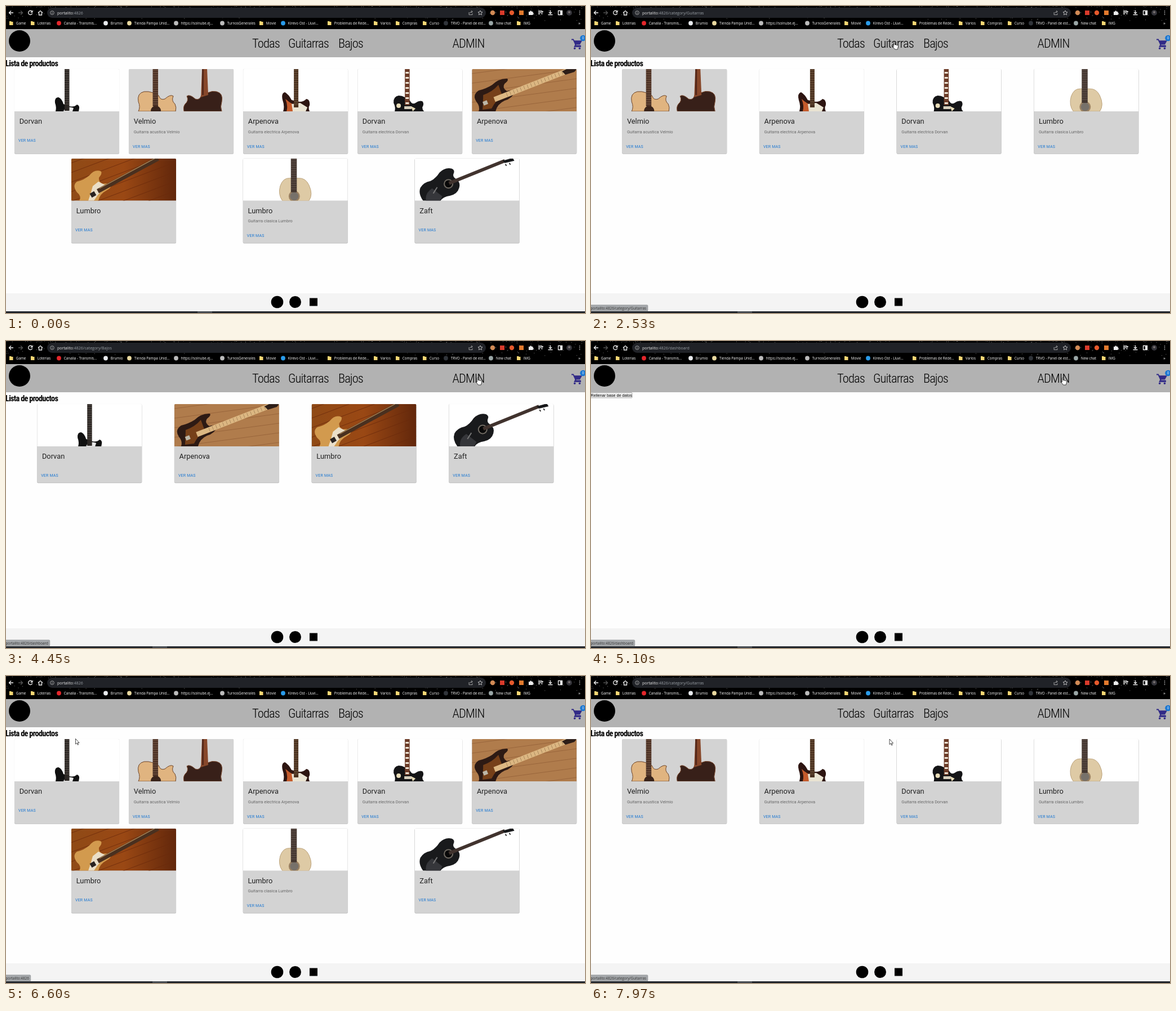
Animation of 1028x545 px, one loop 8 s. Source, as an HTML page:

```html
<!DOCTYPE html>
<html lang="es">
<head>
<meta charset="utf-8">
<title>Lista de productos</title>
<style>
  html, body { margin: 0; width: 100%; height: 100%; overflow: hidden; background: #fff; }
  svg { display: block; width: 100vw; height: 100vh; }
  .ui { font: 6.3px "Open Sans", "Noto Sans", sans-serif; fill: #fff; }
  .address { font-size: 7px; fill: #9aa0a6; }
  .nav { font: 300 22.5px "Roboto Condensed", Roboto, sans-serif; font-stretch: 75%; letter-spacing: -.9px; text-anchor: middle; }
  .heading { font: bold 14.2px "Roboto Condensed", Roboto, sans-serif; font-stretch: 75%; letter-spacing: -.65px; }
  .title { font: 12.85px Roboto, sans-serif; fill: #212121; }
  .about { font: 7.5px Roboto, sans-serif; fill: #666; }
  .more { font: 7px Roboto, sans-serif; letter-spacing: .2px; fill: #1976d2; }
  .button { font: 7.13px "Liberation Sans", Arial, sans-serif; }
  .line { fill: none; stroke: #eee; stroke-width: 1.3; }
</style>
</head>
<body>
<svg id="stage" viewBox="0 0 1028 545"></svg>
<script>
const HOST = 'portalito', PORT = ':4826';
const GUITARS_PATH = '/category/Guitarras', BASSES_PATH = '/category/Bajos', ADMIN_PATH = '/dashboard';
const LOOP = 8000;

const rect = (x, y, w, h, fill, extra = '') => `<rect x="${x}" y="${y}" width="${w}" height="${h}" fill="${fill}" ${extra}/>`;
const circle = (x, y, r, fill, extra = '') => `<circle cx="${x}" cy="${y}" r="${r}" fill="${fill}" ${extra}/>`;
const path = (d, fill, extra = '') => `<path d="${d}" fill="${fill}" ${extra}/>`;
const line = (d, color, width, extra = '') => `<path d="${d}" fill="none" stroke="${color}" stroke-width="${width}" ${extra}/>`;
const icon = (d, extra = '') => `<path class="line" d="${d}" ${extra}/>`;
const text = (cls, x, y, s, extra = '') => `<text class="${cls}" x="${x}" y="${y}" ${extra}>${s}</text>`;

let seed = 7;
const random = () => (seed = (seed * 16807) % 2147483647) / 2147483647;

function stars() {
  let d = '';
  for (let i = 0; i < 330; i++) d += `M${(random() * 1028).toFixed(1)} ${(random() ** 2 * 26).toFixed(1)}h.8`;
  return line(d, '#b4b4b4', .8);
}

function frets(x, width, bottom, color) {
  let d = '';
  for (let y = 2; y < bottom; y += 4) d += `M${x} ${y}h${width}`;
  return line(d, color, .5);
}

function planks(base, seam, slope) {
  let d = '';
  for (let y = -60; y < 140; y += 17) d += `M0 ${y}L186 ${y + slope}`;
  return rect(0, 0, 186, 75, base) + line(d, seam, .8);
}

// Pictures are drawn in a 186 x 75 box.
const white = rect(0, 0, 186, 75, '#fff');
const pictures = {
  blackBass: white
    + path('M73 75Q75 68 72 60Q71 50 78 50Q84 52 87 62L98 66Q106 68 111 63Q117 64 114 75Z', '#111')
    + path('M87 75Q91 64 105 69L103 75Z', '#e8e8e8')
    + rect(89, 0, 8.5, 74, '#2d2825') + frets(89, 8.5, 66, '#8c8078'),
  acousticPair: rect(0, 0, 186, 75, '#d3d3d3')
    + path('M17 75Q21 67 17 58Q14 43 27 40Q35 39 43 42L53 47Q56 56 64 53Q74 44 79 48Q75 56 82 62Q85 68 83 75Z', '#e0b480', 'stroke="#6b4328"')
    + circle(48, 74, 9, '#3a241b') + rect(42.5, 0, 9.5, 66, '#4b3024') + frets(42.5, 9.5, 64, '#a98e70')
    + path('M98 75Q96 67 100 62Q107 56 103 48Q108 44 118 53Q126 56 129 46L140 42Q148 38 156 40Q168 43 165 58Q162 67 165 75Z', '#382019', 'stroke="#7b4a30"')
    + path('M128 50L130 0H139L141 46Z', '#87472a') + rect(130, 0, 3, 46, '#54281a'),
  sunburst: white
    + path('M71 75Q74 66 70 55Q67 43 74 41Q81 45 86 55L100 58Q108 58 112 53Q119 54 118 64Q115 69 118 75Z', '#2d1511')
    + path('M77 75Q80 65 75 53Q84 61 92 64L94 75Z', '#c45b2c')
    + path('M86 62L101 60L114 68L111 75H88Z', '#e9e3d2')
    + rect(90, 0, 8, 68, '#49301f') + frets(90, 8, 64, '#a5886a'),
  singleCut: white
    + path('M66 75Q68 68 64 60Q63 49 73 47Q79 47 84 50L93 56Q97 64 103 60Q109 55 115 57Q119 61 115 68Q115 72 118 75Z', '#141416')
    + circle(73, 65, 4, '#e8dcb8') + rect(83, 66, 13, 5, '#d8d0bd') + path('M98 75L95 66L103 70Z', '#e8dcb8')
    + rect(84, 0, 8.5, 64, '#6c3c28') + line('M88.2 5V64', '#efe6d8', 6, 'stroke-dasharray="3 6"'),
  darkBass: planks('#b07c4c', '#946038', -25)
    + path('M12 75Q15 66 8 58Q0 46 12 38Q25 35 36 28Q48 16 63 17Q66 20 58 26Q53 33 62 39Q72 36 76 40Q72 52 58 56Q45 62 42 75Z', '#2d1a14')
    + path('M19 72Q20 55 20 46Q37 40 47 28L54 47Q42 56 35 70Z', '#764019')
    + line('M40 54L170 3', '#dcb782', 9) + line('M62 45.400L166 4.600', '#8f6e48', 7, 'stroke-dasharray=".6 6"')
    + path('M160 4L168 0H186L182 5L166 10Z', '#2d1e18') + rect(20, 56, 8, 7, '#bdb7a8', 'transform="rotate(-22 25 60)"'),
  goldBass: planks('url(#redWood)', '#6b2a0c', -70)
    + path('M14 75Q19 67 10 60Q1 48 10 41Q23 38 32 30Q42 18 53 23Q55 27 49 34Q48 41 55 45Q64 43 70 46Q72 52 62 57Q50 63 48 75Z', '#d29a4e')
    + path('M38 49L48 41L62 48L46 66L40 75H30Q35 61 38 49Z', '#eadfc8') + rect(34, 60, 9, 8, '#292321', 'transform="rotate(-30 38 64)"')
    + line('M47 58L154 0', '#49301f', 8) + line('M50 53L148 0', '#b18a58', 1.2),
  classical: white
    + path('M70 75Q62 64 66 49Q71 34 83 35H98Q111 34 117 47Q125 64 117 75Z', '#decaa5', 'stroke="#bba27b"')
    + circle(91, 67, 10, '#9c8262') + circle(91, 67, 7.5, '#77716a') + rect(85, 0, 10.5, 60, '#443731') + frets(85, 10.5, 58, '#83736a'),
  blackAcoustic: white
    + path('M15 75Q6 63 10 52Q16 42 28 40Q37 36 44 25Q54 15 66 18Q72 21 69 27Q67 32 73 36Q82 42 79 52Q76 63 63 66Q50 68 46 75Z', '#191a1c')
    + path('M20 75Q18 61 31 53L49 67L45 75Z', '#35363a')
    + circle(60, 45, 8.5, '#706a62') + circle(60, 45, 6.5, '#080808') + line('M33 62L40 51', '#777', 2)
    + line('M61 44L160 4', '#41332e', 6) + path('M156 4L174 -1L177 4L160 8Z', '#17181a')
    + line('M161 10L163 13M168 8L170 11', '#333', 2)
};

const products = {
  stageBass: ['Dorvan', '', 'blackBass'],
  duo: ['Velmio', 'acustica', 'acousticPair'],
  burst: ['Arpenova', 'electrica', 'sunburst'],
  cut: ['Dorvan', 'electrica', 'singleCut'],
  dark: ['Arpenova', '', 'darkBass'],
  gold: ['Lumbro', '', 'goldBass'],
  nylon: ['Lumbro', 'clasica', 'classical'],
  black: ['Zaft', '', 'blackAcoustic']
};

function card(id, x, y, height) {
  const [brand, kind, picture] = products[id];
  return `<g transform="translate(${x} ${y})">`
    + rect(0, .7, 186, height, '#000', 'rx="2" opacity=".28"') + rect(-.4, -.2, 186.8, height, '#000', 'rx="2" opacity=".05"')
    + rect(0, 0, 186, height, '#d3d3d3', 'rx="2"')
    + `<g clip-path="url(#photo)">${pictures[picture]}</g>`
    + text('title', 8.7, 97, brand)
    + (kind && text('about', 8.7, 113.5, `Guitarra ${kind} ${brand}`))
    + text('more', 7, kind ? 139.7 : 129, 'VER MAS') + '</g>';
}

const row = (ids, left, step, y, height) => ids.split(' ').map((id, i) => card(id, left + i * step, y, height)).join('');
const views = {
  all: row('stageBass duo burst cut dark', 15, 203.05, 112, 150) + row('gold nylon black', 116, 304.8, 270.7, 150),
  guitars: row('duo burst cut nylon', 55.2, 243.7, 112, 150),
  basses: row('stageBass dark gold black', 55.2, 243.7, 112, 139.5),
  admin: rect(-2, 91.7, 75, 9.2, '#efefef', 'rx="1" stroke="#767676" stroke-width=".6"') + text('button', -.5, 98.7, 'Rellenar base de datos'),
  empty: ''
};

const bookmarks = [
  [9, 'Game'], [47, 'Loterias'], [94, 'Canalia - Transmis...', '#e5262b'], [177, 'Brumio', '#e8eaed'],
  [219, 'Tienda Pampa Unid...', '#e9d9a0'], [302, 'https://solnube.ej...', '#bbb'], [384, 'TurnosGenerales', '#bbb'],
  [453, 'Movie'], [492, 'Kirevo Ost - Lluvi...', '#299bea'], [574, 'Problemas de Rede...'], [656, 'Varios'], [695, 'Compras'],
  [743, 'Curso'], [781, 'TRVO - Panel de est...', '#30343a'], [861, 'New chat', '#9aa6a6'], [910, 'IMG']
];
const bookmark = ([x, label, color]) =>
  (color ? circle(x, 30.5, 3.9, color) : path(`M${x - 3} 27h3l1 1h2.5v6h-6.5z`, '#f7d774'))
  + text('ui', x + 8.8, 32.7, label);

const browser = rect(0, 0, 1028, 41, '#000') + stars()
  + rect(73, 3, 779, 18, '#202227', 'rx="9"')
  + icon('M13 12H5.5M9 8.5L5.5 12L9 15.5') + icon('M22 12h7.5M26 8.5l3.5 3.5L26 15.5', 'opacity=".35"')
  + icon('M46 9.5A3.6 3.6 0 1 0 46.7 13M46.8 8v3h-3') + icon('M57 12l4-3.5l4 3.5M58.5 11.5v4.5h5v-4.5')
  + circle(82, 12, 3.3, 'none', 'stroke="#bbb" stroke-width=".8"') + line('M82 11.5v2.5M82 10v.8', '#bbb', .8)
  + line('M822 11v4.5h6V13M823.5 13Q824 10 828 10M826 8l2.3 2l-2.3 2', '#bbb', .8)
  + line('M842 8l1.2 2.6l2.8.3l-2.1 1.9l.6 2.9l-2.5-1.5l-2.5 1.5l.6-2.9l-2.1-1.9l2.8-.3z', '#ddd', .8)
  + circle(864, 12, 4.2, '#d18a55') + rect(877, 8, 8, 8, '#d83a2b') + circle(898, 12, 4.2, '#e5592c') + rect(911, 8, 8, 8, '#e27a2e')
  + path('M928 10h2.5v-1.5h2.5V10h2.5v2.5h1.3v2h-1.3V16H928z', '#eee')
  + icon('M945 9h7M945 11.5h5M945 14h3M951.5 15V10h2.5') + icon('M966.5 7.5v6M964 11l2.5 2.5l2.5-2.5M962.5 15.5h8')
  + icon('M980.5 8.5h7v7h-7z') + rect(984, 8, 4, 8, '#eee')
  + circle(1000, 12, 5, '#34343a') + circle(1000, 11, 2, '#77706f')
  + [9, 12, 15].map(y => circle(1018.5, y, .8, '#eee')).join('')
  + bookmarks.map(bookmark).join('') + text('ui', 1016, 33, '»', 'style="font-size:8px"');

const page = rect(0, 41, 1028, 50, '#b2b2b2') + circle(24, 62, 19, '#000')
  + text('nav', 461.5, 74, 'Todas') + text('nav', 537, 74, 'Guitarras') + text('nav', 612, 74, 'Bajos') + text('nav', 821, 74, 'ADMIN')
  + line('M1004 59.5h3.2l5 11h8.5', '#312a87', 1.8) + path('M1008 61.3h15l-4 7.2h-8z', '#312a87')
  + line('M1011.5 68l-2 4.2h11.5', '#312a87', 1.7) + circle(1009.7, 75.3, 1.8, '#312a87') + circle(1018.5, 75.3, 1.8, '#312a87')
  + circle(1024.5, 57, 5.3, '#1976d2') + text('ui', 1022.8, 59.2, '0')
  + rect(0, 510, 1028, 32, '#f4f4f4') + circle(481.5, 525.5, 10.8, '#000') + circle(513.5, 525.5, 10.5, '#000') + rect(539, 518.5, 14, 14, '#000')
  + rect(0, 542, 1028, 3, '#20242a');

document.getElementById('stage').innerHTML = `<defs>
    <clipPath id="photo"><path d="M0 75V2Q0 0 2 0H184Q186 0 186 2V75Z"/></clipPath>
    <linearGradient id="redWood"><stop stop-color="#8f4a16"/><stop offset=".5" stop-color="#9a4814"/><stop offset="1" stop-color="#62270b"/></linearGradient>
  </defs>`
  + rect(0, 0, 1028, 545, '#fefefe') + page + browser
  + `<text class="ui address" x="91" y="14.6"><tspan fill="#eee">${HOST}</tspan>${PORT}<tspan id="route"></tspan></text>`
  + text('heading', -1, 106.7, 'Lista de productos', 'id="heading"')
  + Object.entries(views).map(([name, content]) => `<g id="${name}">${content}</g>`).join('')
  + rect(340, 542, 26, 3, '#454a50', 'id="task"')
  + `<g id="status">${rect(-2, 530.7, 50, 11.3, '#a4a7aa', 'rx="1.5" stroke="#85888b" stroke-width=".5"')}${text('ui', -.5, 538.7, '', 'style="fill:#333"')}</g>`
  + `<g id="cursor">${circle(1, 2, 9, '#d8d000', 'id="click" opacity=".7"')}`
  + path('M0 0V9.6L2.2 7.6L3.8 11L5.2 10.4L3.7 7.2H6.6Z', '#fff', 'id="arrow" stroke="#000" stroke-width=".7"')
  + path('M1.5 8V1.2Q2.4 -.2 3.3 1.2V5L8.6 6.1Q9.8 6.5 9.4 9L8.3 13.5H3.6L.2 9.3Q-.4 7.7 1.5 8Z', '#fff', 'id="hand" stroke="#000" stroke-width=".7"') + '</g>';

const el = Object.fromEntries([...document.querySelectorAll('#stage [id]')].map(node => [node.id, node]));
const [statusBox, statusText] = el.status.children;

// status: null hides the bar, '' is the home address
const changes = [
  [0, { route: '', view: 'all', status: null, task: 340 }],
  [1720, { status: GUITARS_PATH, task: 260 }],
  [1790, { route: GUITARS_PATH }],
  [2530, { view: 'guitars' }],
  [2980, { status: null }],
  [3150, { status: BASSES_PATH }],
  [3430, { route: BASSES_PATH }],
  [3610, { view: 'basses' }],
  [4040, { status: null }],
  [4310, { status: ADMIN_PATH }],
  [4510, { route: ADMIN_PATH, view: 'admin' }],
  [5400, { status: null }],
  [5740, { status: '' }],
  [6070, { route: '', view: 'empty' }],
  [6400, { view: 'all' }],
  [6850, { status: null }],
  [7160, { status: GUITARS_PATH }],
  [7570, { route: GUITARS_PATH }],
  [7710, { view: 'guitars' }]
];
const clicks = [[1720, 1860], [3360, 3430], [4380, 4450], [6010, 6070], [7500, 7570]];
const links = [[3, 44], [440, 484], [502, 573], [592, 634], [796, 846]];

const smooth = p => p * p * (3 - 2 * p), easeIn = p => p * p, easeOut = p => p * (2 - p);
const track = [
  [320, 943, 521], [1080, 523, 89.5], [1160, 523, 89.5], [1580, 536, 63.5], [2800, 536, 63.5],
  [3290, 604.5, 62.5], [3810, 604.5, 62.5], [4380, 835, 64.5], [5100, 835, 64.5],
  [5810, 22.5, 61], [6400, 22.5, 61], [6600, 122, 111.5, easeIn], [7160, 536, 67, easeOut],
  [7230, 536, 67], [7400, 548, 67], [7500, 536, 64], [7900, 536, 64], [7970, 530, 112]
];

function cursorAt(t) {
  const next = track.findIndex(point => point[0] > t);
  if (next <= 0) return track.at(next).slice(1, 3);
  const [t0, x0, y0] = track[next - 1], [t1, x1, y1, ease = smooth] = track[next];
  const p = ease((t - t0) / (t1 - t0));
  return [x0 + (x1 - x0) * p, y0 + (y1 - y0) * p];
}

const show = (node, on) => node.setAttribute('display', on ? 'inline' : 'none');

function draw(now) {
  const t = now % LOOP;
  const state = Object.assign({}, ...changes.filter(([start]) => start <= t).map(([, change]) => change));

  el.route.textContent = state.route;
  for (const name in views) show(el[name], name === state.view);
  show(el.heading, state.view !== 'admin');
  el.task.setAttribute('x', state.task);

  show(el.status, state.status !== null);
  if (state.status !== null) {
    statusText.textContent = HOST + PORT + state.status;
    statusBox.setAttribute('width', statusText.getComputedTextLength() + 4.5);
  }

  const [x, y] = cursorAt(t);
  const overLink = y < 78 && links.some(([left, right]) => x + 2 > left && x + 2 < right);
  show(el.cursor, t >= track[0][0]);
  el.cursor.setAttribute('transform', `translate(${x} ${y})`);
  show(el.hand, overLink);
  show(el.arrow, !overLink);
  show(el.click, clicks.some(([start, end]) => t >= start && t < end));
}

const begin = performance.now();
(function frame() {
  draw(performance.now() - begin);
  requestAnimationFrame(frame);
})();
</script>
</body>
</html>
```
